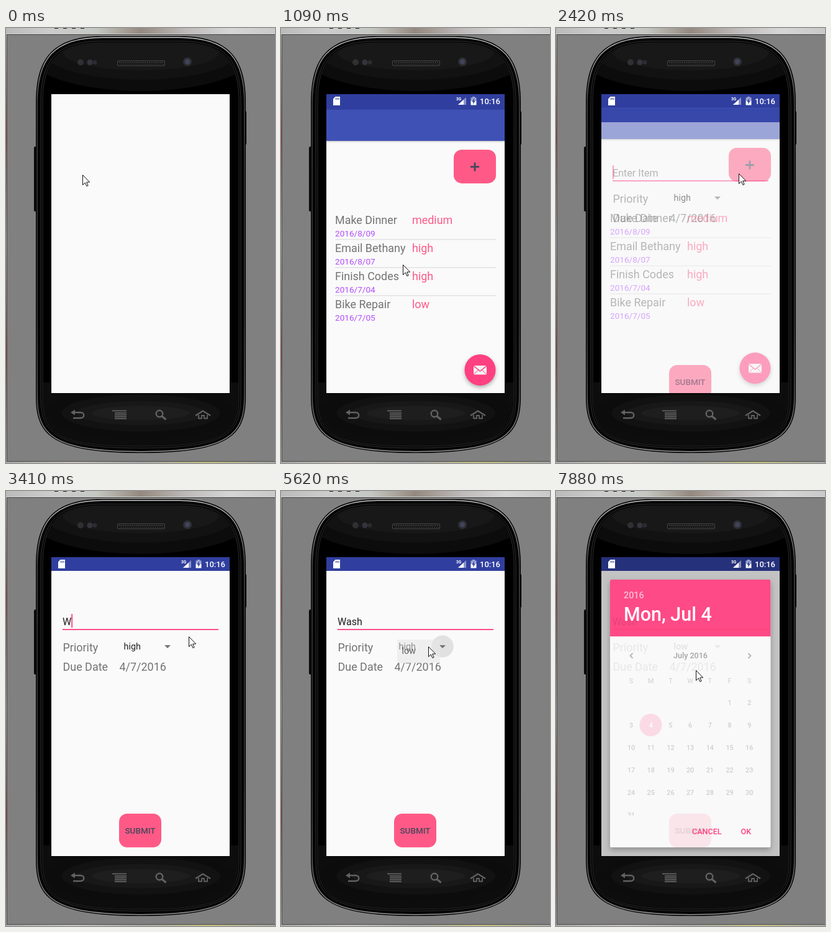
Animation of 433x697 px, one loop 8000 ms. Source, as an HTML page with a canvas:

```html
<!DOCTYPE html>
<html lang="en">
<head>
<meta charset="utf-8">
<title>Task list on a phone</title>
<style>
  html, body { margin: 0; width: 100%; height: 100%; overflow: hidden; background: #808080; }
  canvas { display: block; }
</style>
</head>
<body>
<canvas id="stage" width="433" height="697"></canvas>
<script>
const ctx = document.getElementById('stage').getContext('2d');
const LOOP = 8000;
const PINK = '#ff4081', BUTTON = '#ff5a87', PAPER = '#fafafa', GRAY = '#737373';
const INDIGO = '#3f51b5', INDIGO_DARK = '#303f9f';

const between = (t, start, end) => t >= start && t < end;
const easeInOut = p => p * p * (3 - 2 * p);

// Index of the current one of n held poses, the last starting at end; -1 before start.
function pose(t, start, end, n) {
  if (t < start) return -1;
  return Math.min(n - 1, Math.floor((t - start) / (end - start) * (n - 1)));
}

function rect(x, y, w, h, color) {
  ctx.fillStyle = color;
  ctx.fillRect(x, y, w, h);
}
function round(x, y, w, h, r, color) {
  ctx.beginPath();
  ctx.roundRect(x, y, w, h, r);
  ctx.fillStyle = color;
  ctx.fill();
}
function oval(x, y, rx, ry, color) {
  ctx.beginPath();
  ctx.ellipse(x, y, rx, ry, 0, 0, 2 * Math.PI);
  ctx.fillStyle = color;
  ctx.fill();
}
function fillPath(d, color) {
  ctx.fillStyle = color;
  ctx.fill(new Path2D(d));
}
function strokePath(d, color, width = 1) {
  ctx.strokeStyle = color;
  ctx.lineWidth = width;
  ctx.stroke(new Path2D(d));
}
function text(s, x, y, size, color, weight = 400, align = 'left') {
  ctx.font = `${weight} ${size}px Roboto, sans-serif`;
  ctx.textAlign = align;
  ctx.fillStyle = color;
  ctx.fillText(s, x, y);
}
function saved(draw) {
  ctx.save();
  draw();
  ctx.restore();
}
function clipRect(x, y, w, h) {
  ctx.beginPath();
  ctx.rect(x, y, w, h);
  ctx.clip();
}
function withShadow(blur, dy, alpha, draw) {
  saved(() => {
    ctx.shadowColor = `rgba(0,0,0,${alpha})`;
    ctx.shadowBlur = blur;
    ctx.shadowOffsetY = dy;
    draw();
  });
}
function layer(alpha, dy, draw) {
  saved(() => {
    ctx.globalAlpha = alpha;
    ctx.translate(0, dy);
    draw();
  });
}
function gradient(x, y, colors) {
  const g = ctx.createLinearGradient(0, 0, x, y);
  colors.forEach((c, i) => g.addColorStop(i / (colors.length - 1), c));
  return g;
}

/* ---- desktop and phone ---- */

function bodyPath(inset) {
  const l = 48 + inset, r = 386 - inset, top = 13 + inset, bottom = 681 - inset;
  ctx.beginPath();
  ctx.moveTo(l, 120);
  ctx.bezierCurveTo(l, 52, 72 + inset, top, 155, top);
  ctx.lineTo(279, top);
  ctx.bezierCurveTo(362 - inset, top, r, 52, r, 120);
  ctx.lineTo(r, 590);
  ctx.bezierCurveTo(r, 650, 364 - inset, bottom, 217, bottom);
  ctx.bezierCurveTo(70 + inset, bottom, l, 650, l, 590);
  ctx.closePath();
}
function ring(inset, color, width) {
  bodyPath(inset);
  ctx.strokeStyle = color;
  ctx.lineWidth = width;
  ctx.stroke();
}
// Stacked ovals, each smaller and lighter than the one below.
function glow(x, y, rx, ry, bands) {
  for (let i = 0; i < bands; i++) {
    const size = 1 - i * 0.16, v = 12 + i * 6;
    oval(x, y, rx * size, ry * size * size, `rgb(${v},${v},${v})`);
  }
}

function drawDesktop() {
  rect(0, 0, 433, 697, '#808080');
  rect(0, 0, 433, 9, gradient(433, 0, ['#bbb', '#ccc', '#c5c8c2', '#95897f', '#bdb9b8', '#d6d6d6', '#c9c9c9']));
  for (let x = 78; x < 125; x += 14) rect(x, 0, 6, 1, '#111');
  rect(0, 9, 433, 1, '#d0d0d0');
  rect(0, 10, 1, 685, gradient(0, 695, ['#b5b5b5', '#a04545', '#aaa', '#963f3f', '#aaa']));
  rect(1, 10, 1, 685, '#4a4a4a');
  rect(1, 10, 432, 1, '#454545');
  rect(1, 694, 432, 1, '#4a4a4a');
  rect(0, 695, 433, 2, gradient(433, 0, ['#aaa', '#c8c4bc', '#aaa', '#c4c080', '#aaa']));
}

function drawNavIcons() {
  const c = '#626262';
  strokePath('M109 616H120C127 616 127 625 120 625H108', c, 2.4);
  fillPath('M104 616L111 611.5V620.5Z', c);
  rect(171, 612.5, 23, 1.8, c);
  for (let y = 616; y < 627; y += 3) rect(175, y, 19, 1.8, c);
  strokePath('M252.3 618A5.3 5.3 0 1 1 241.7 618A5.3 5.3 0 1 1 252.3 618', c, 2.4);
  strokePath('M251 622L257.5 627.5', c, 3);
  strokePath('M305 621L317 613.5L329 621', c, 2.2);
  strokePath('M310 620V625.5H315V621H319V625.5H324V620', c, 1.8);
}

function drawPhone() {
  round(45, 190, 5, 104, 2, '#0a0a0a');
  round(383, 133, 4, 54, 2, '#0a0a0a');
  bodyPath(0);
  ctx.fillStyle = '#040404';
  ctx.fill();
  ring(2.2, gradient(0, 697, ['#d8d8d8', '#484848', '#3a3a3a', '#3a3a3a', '#3a3a3a', '#555', '#a0a0a0']), 1.5);
  ring(8, '#303030', 1);
  ring(11, '#2b2b2b', 1);

  saved(() => {
    bodyPath(12);
    ctx.clip();
    rect(48, 13, 338, 668, '#000');
    glow(217, 39, 185, 62, 3);
    rect(48, 568, 338, 114, '#0d0d0d');
    glow(217, 617, 152, 42, 4);
  });
  rect(72, 105, 289, 481, '#000');

  oval(120, 55, 5, 5, '#303033');
  oval(135, 55, 4.5, 4.5, '#34343f');
  oval(143, 55, 3.5, 3.5, '#2b2b31');
  oval(292, 54, 7, 7, '#2e2e33');
  oval(292, 54, 4, 4, '#41435a');
  round(179, 52, 77, 9, 3, '#484848');
  round(180, 53, 75, 7, 2.5, '#111');
  for (let x = 182; x < 253; x += 3) {
    rect(x, 54, 1.5, 2, '#4a4a4a');
    rect(x + 1, 57, 1.5, 2, '#3d3d3d');
  }
  drawNavIcons();
}

/* ---- app screens ---- */

function drawBlankScreen(toolbar) {
  rect(73, 128, 287, 457, PAPER);
  if (toolbar) withShadow(3, 1, 0.3, () => rect(73, 128, 287, 50, INDIGO));
  rect(73, 106, 287, 22, INDIGO_DARK);
}

const TASKS = [
  ['Make Dinner', 'medium', '2016/8/09'],
  ['Email Bethany', 'high', '2016/8/07'],
  ['Finish Codes', 'high', '2016/7/04'],
  ['Bike Repair', 'low', '2016/7/05'],
];

function drawList() {
  drawBlankScreen(true);
  round(278, 192, 68, 54, 13, BUTTON);
  strokePath('M305 219.5H319M312 212.5V226.5', '#45475a', 2.8);
  TASKS.forEach(([title, priority, date], i) => {
    const y = i * 45;
    text(title, 87, 311 + y, 17.95, GRAY);
    text(priority, 211, 311 + y, 17.95, BUTTON);
    text(date, 87, 331 + y, 13.6, '#b14dff');
    if (i < 3) rect(87, 335.5 + y, 259, 1, '#d6d6d6');
  });
  withShadow(6, 3, 0.3, () => oval(320.5, 545, 25, 25, PINK));
  rect(310, 538, 21, 14.5, '#f4f4f4');
  strokePath('M310 538.5L320.5 547L331 538.5', PINK, 1.4);
  strokePath('M310 552.5L317.5 545M331 552.5L323.5 545', PINK, 1);
}

function drawForm(t) {
  drawBlankScreen(false);
  const typed = 'Wash'.slice(0, pose(t, 3410, 4080, 4) + 1);
  const caret = t < 5620 && !between(t, 2970, 3410) && !between(t, 4640, 5070);
  text(typed || 'Enter Item', 91, 214.5, 16.1, typed ? '#1e1e1e' : GRAY);
  if (caret) rect(91 + (typed ? ctx.measureText(typed).width : 0), 197, 1.8, 22, PINK);
  rect(91, 221, 251, 1.8, PINK);

  if (between(t, 5620, 6020)) {
    const ripple = 1 - pose(t, 5620, 6020, 4) / 3;
    oval(260, 249, 17.7, 17.7, `rgba(0,0,0,${0.1 * ripple})`);
  }
  text('Priority', 91.5, 257, 17.95, GRAY);
  text(t < 7170 ? 'high' : 'low', 189.5, 254, 14.35, '#222');
  fillPath('M255 247H265L260 252Z', '#757575');
  text('Due Date', 91.5, 287.5, 17.95, GRAY);
  text('4/7/2016', 182.5, 287.5, 17.95, GRAY);
  round(182, 517, 68, 54, 13, BUTTON);
  text('SUBMIT', 216, 549, 13.5, '#45475a', 500, 'center');
}

function drawDropdown(t) {
  if (!between(t, 5620, 7310)) return;
  const opening = pose(t, 5620, 6020, 4) / 3;
  if (!opening) {
    round(187, 238, 69, 38, 2, 'rgba(232,232,232,.55)');
    text('low', 194.5, 261, 14.35, 'rgba(0,0,0,.6)');
  }
  layer(t < 7170 ? opening : 0.4, 0, () => {
    round(169, 230, 96, 157, 14, 'rgba(0,0,0,.012)');
    withShadow(9, 3, 0.32, () => round(182, 238, 67.5, 129, 2, '#fdfdfd'));
    if (t >= 7030) rect(182, 281, 67.5, 43, '#e4e4e4');
    ['high', 'low', 'medium'].forEach((s, i) => text(s, 189.5, 264.5 + i * 43, 14.35, '#111'));
  });
}

function drawCalendar() {
  const firstWeekday = 5;
  const columnX = i => 121 + i * 31.7;
  [...'SMTWTFS'].forEach((d, i) => text(d, columnX(i), 308, 10.77, '#cfcfcf', 400, 'center'));
  oval(152.5, 375, 18, 18, '#fadbe5');
  saved(() => {
    clipRect(87, 290, 258, 230);
    for (let day = 1; day <= 31; day++) {
      const cell = day + firstWeekday - 1;
      text(day, columnX(cell % 7), 342.5 + Math.floor(cell / 7) * 36, 10.77,
        day === 4 ? '#fff' : '#cfcfcf', 500, 'center');
    }
  });
}

function drawDatePicker(t) {
  rect(73, 106, 287, 479, 'rgba(0,0,0,.22)');
  withShadow(10, 4, 0.28, () => round(87, 142, 258.5, 429, 2, PAPER));
  round(87, 142, 258.5, 91, [2, 2, 0, 0], '#ff4a87');
  // The form still shows faintly through the opening dialog.
  saved(() => {
    clipRect(87, 142, 258.5, 429);
    ctx.globalCompositeOperation = 'multiply';
    layer(0.12, 0, () => drawForm(t));
  });
  text('2016', 109, 172, 14.35, 'rgba(255,255,255,.65)', 500);
  text('Mon, Jul 4', 109, 208, 30.5, '#fff', 500);
  strokePath('M123.5 260L119.5 264L123.5 268', '#b4b4b4', 1.8);
  strokePath('M309.5 260L313.5 264L309.5 268', '#b4b4b4', 1.8);
  text('July 2016', 216.5, 268, 12.56, '#a4a4a4', 500, 'center');
  drawCalendar();
  text('CANCEL', 219, 550, 12.56, PINK, 500);
  text('OK', 297.5, 550, 12.56, PINK, 500);
}

function drawStatusIcons() {
  fillPath('M87.5 110H95V124H84V113.5Z', '#fff');
  for (let x = 88; x < 93; x += 2.2) rect(x, 112, 1, 3, INDIGO_DARK);
  text('3G', 282, 116, 6.5, '#fff', 700);
  fillPath('M298 111V123H285Z', 'rgba(255,255,255,.45)');
  fillPath('M294 114.7V123H285Z', '#fff');
  rect(308, 110, 4, 2, '#9ba3d0');
  rect(305.5, 111.5, 9, 5, '#9ba3d0');
  rect(305.5, 116.5, 9, 7, '#fff');
  fillPath('M311 112.5L307.3 118.3H309.5L309 122.3L312.8 116.7H310.5Z', INDIGO_DARK);
  text('10:16', 320, 122, 13, '#fff', 500);
}

const MOVES = [
  { start: 150, end: 660, poses: 4, x: 196, y: 379 },
  { start: 1640, end: 2150, poses: 5, x: 294, y: 233 },
  { start: 5070, end: 5220, poses: 2, x: 237, y: 249 },
  { start: 6160, end: 6440, poses: 3, x: 205, y: 306 },
  { start: 7310, end: 7460, poses: 2, x: 225, y: 287 },
];

function drawPointer(t) {
  let x = 123, y = 235;
  for (const move of MOVES) {
    const p = easeInOut((pose(t, move.start, move.end, move.poses) + 1) / move.poses);
    x += (move.x - x) * p;
    y += (move.y - y) * p;
  }
  saved(() => {
    ctx.translate(Math.round(x) + 0.5, Math.round(y) + 0.5);
    const arrow = 'M0 0V16L3.8 12.4L6.4 18L8.6 17L6.2 11.5H11.2Z';
    fillPath(arrow, '#fff');
    strokePath(arrow, '#111');
  });
}

// A new screen fades in while it rises into place.
function openScreen(t, start, end, draw) {
  if (t < start) return;
  const p = pose(t, start, end, 3) / 2;
  layer(Math.min(1, 0.5 + p), 23 * (1 - p) ** 3, draw);
}

function drawScreen(t) {
  saved(() => {
    clipRect(73, 106, 287, 479);
    rect(73, 106, 287, 479, PAPER);
    if (t >= 150) rect(73, 106, 287, 22, INDIGO_DARK);
    openScreen(t, 150, 490, () => drawBlankScreen(true));
    openScreen(t, 940, 1240, drawList);
    openScreen(t, 2420, 2700, () => drawForm(t));
    drawDropdown(t);
    if (t >= 7880) drawDatePicker(t);
    if (t >= 150) drawStatusIcons();
    drawPointer(t);
  });
}

function frame(now) {
  drawDesktop();
  drawPhone();
  drawScreen(now % LOOP);
  requestAnimationFrame(frame);
}
requestAnimationFrame(frame);
</script>
</body>
</html>
```
